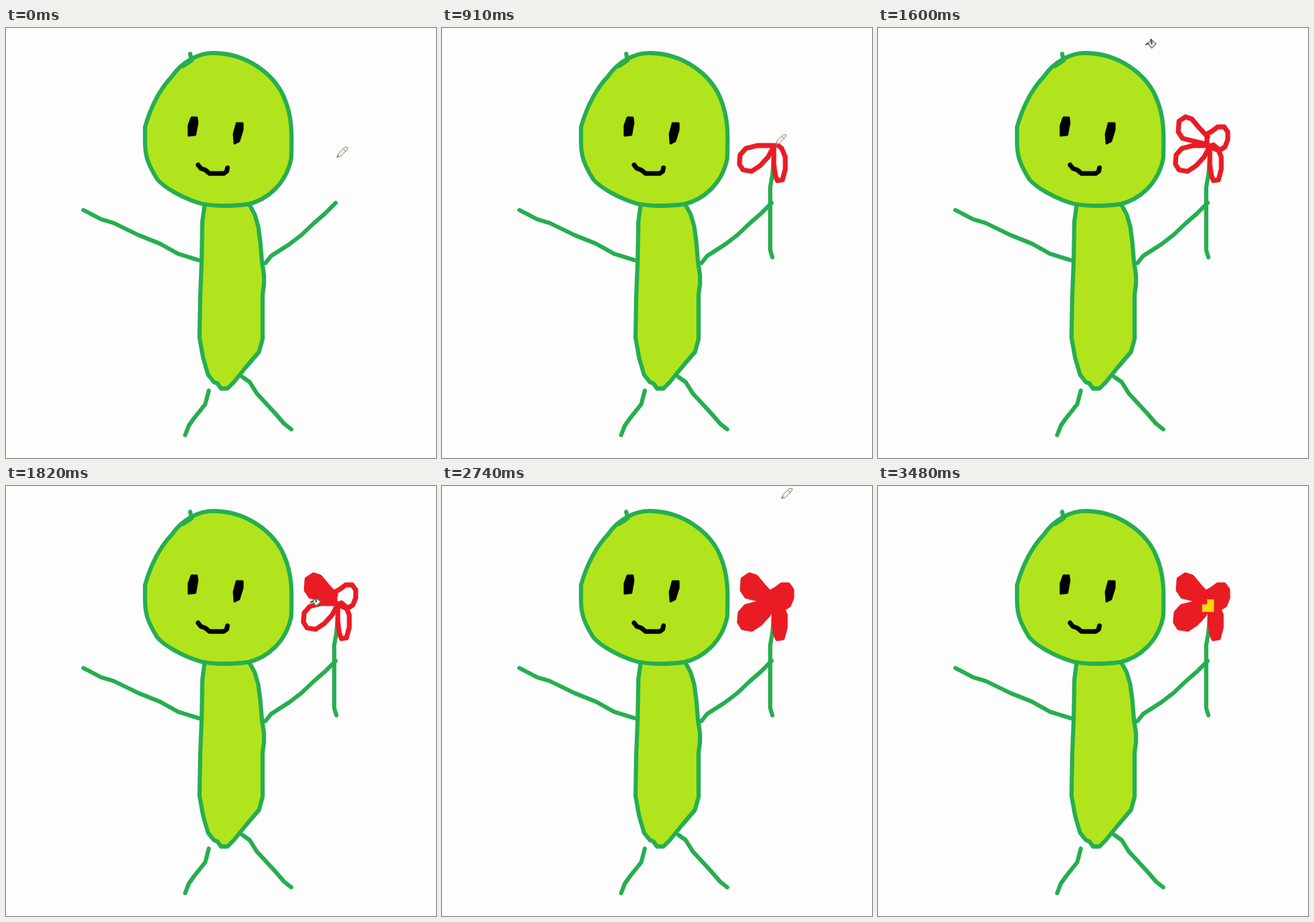
An HTML page for the animation above (3.5 s loop, 600x600 px).

```html
<!DOCTYPE html>
<html lang="en">
<head>
<meta charset="utf-8">
<title>Flower doodle</title>
<style>
html, body { margin: 0; width: 100%; height: 100%; overflow: hidden; background: #fdfdfd; }
svg { display: block; width: 100vw; height: 100vh; }
path { stroke-linejoin: round; stroke-linecap: round; }
.line { fill: none; stroke: #26ae50; stroke-width: 5.8; }
.skin { fill: #b1e41c; }
.eye { stroke: #000; stroke-width: 3; }
</style>
</head>
<body>
<svg viewBox="0 0 600 600">
  <g class="line">
    <path class="skin" d="M277 248L274 270 273 325 271 375 270 432 275 460 282 484 290 494 295 496 300 503 309 503 318 494 335 473 353 452 358 434 358 372 360 357 360 345 357 325 355 300 352 277 347 260 340 247"/>
    <path class="skin" d="M292 35C336 36 374 64 388 97C400 125 399 150 398 182C391 217 365 240 337 246C310 249 290 249 272 245C245 237 220 222 211 211C198 190 194 178 194 160L194 138C202 110 215 85 232 67C245 48 268 34 292 35Z"/>
    <path d="M257 36L259 45 247 53 255 48"/>
    <path d="M108 254L133 267 150 272 185 289 215 301 240 315 269 324"/>
    <path d="M362 328L370 318 395 302 412 289 430 272 445 259 460 244"/>
    <path d="M283 506L278 525 262 545 255 555 250 568"/>
    <path d="M330 487L340 494 350 510 375 537 388 552 398 560"/>
  </g>
  <path class="eye" d="M259 125L266 125 267 132 264 149 255 150 255 136Z"/>
  <path class="eye" d="M322 133L330 133 330 142 325 158 319 161 318 148Z"/>
  <path d="M268 191L272 196 278 198 284 203 304 203 308 200 309 195" fill="none" stroke="#000" stroke-width="6.5"/>
  <g id="ink" fill="none"></g>
  <g id="pencil" stroke-width="1">
    <path d="M0 0L2 -5 11 -14 15 -13 14 -10 5 -1Z" fill="#f5f1e6" stroke="#8b8b80"/>
    <path d="M9 -11L12 -8" stroke="#b5624f"/>
    <path d="M0 0L2 -2" stroke="#444"/>
  </g>
  <g id="bucket" stroke-width="1.3">
    <path d="M-4 0L0 -6 7 0 1 6Z" fill="#f6f8f1" stroke="#64725c"/>
    <path d="M-7 1L-4 -1M0 -6L1 0" fill="none" stroke="#3f5038" stroke-width="2"/>
  </g>
</svg>
<script>
const LOOP = 3500, STEP = 20;
const GREEN = '#26ae50', RED = '#e91c24', YELLOW = '#f8d90f';
const WIDTH = { [GREEN]: 5.8, [RED]: 6.8, [YELLOW]: 9.5 };
const $ = id => document.getElementById(id);

// start, end, tool, path, ink colour, time the shape is filled
const steps = [
  [0, 20, 'pencil', 'M462 180L463 183'],
  [20, 300, 'pencil', 'M463 183L461 205 458 222 458 245 458 310 461 320', GREEN],
  [300, 550, 'pencil', 'M461 320C510 300 525 225 471 173'],
  [550, 650, 'pencil', 'M471 173L463 163'],
  [650, 780, 'pencil', 'M463 164L440 164 424 168 416 177 415 190 420 198 432 200 444 192 455 180 463 165', RED, 1860],
  [780, 890, 'pencil', 'M463 165L463 190 465 205 468 213 475 212 479 197 479 180 474 168 468 163', RED, 1950],
  [890, 920, 'pencil', 'M468 163L458 160'],
  [920, 1090, 'pencil', 'M459 162L459 148 466 144 474 138 483 138 488 145 488 156 484 166 476 171 464 166', RED, 2140],
  [1090, 1280, 'pencil', 'M460 152L448 139 438 127 429 124 420 130 419 145 425 154 437 157 458 162', RED, 1770],
  [1280, 1460, 'pencil', 'M458 162L521 20'],
  [1600, 1760, 'bucket', 'M381 22L434 140'],
  [1790, 1850, 'bucket', 'M434 140L430 183'],
  [1880, 1940, 'bucket', 'M430 183L471 195'],
  [1970, 2050, 'bucket', 'M471 195L479 153'],
  [2140, 2290, 'bucket', 'M479 153L543 125'],
  [2740, 3000, 'pencil', 'M474 17L464 162'],
  [3000, 3300, 'pencil', 'M464 163L464 171 457 171 457 170', YELLOW],
  [3300, 3480, 'pencil', 'M457 170L493 48']
].map(([from, to, tool, d, color, fillAt = Infinity]) => {
  const path = document.createElementNS('http://www.w3.org/2000/svg', 'path');
  path.setAttribute('d', d);
  if (color) {
    path.setAttribute('stroke', color);
    path.setAttribute('stroke-width', WIDTH[color]);
    if (color === YELLOW) path.style.cssText = 'stroke-linecap:square;stroke-linejoin:miter';
    $('ink').append(path);
  }
  return { from, to, tool, path, color, fillAt, length: path.getTotalLength() };
});

// spans in which the pointer is visible
const visits = [[0, 1460], [1600, 2290], [2740, 3480]];
const ease = p => p * p * (3 - 2 * p);
const progress = (s, t) => Math.min(1, Math.max(0, (t - s.from) / (s.to - s.from)));

function draw(t) {
  let current = steps[0];
  for (const s of steps) {
    if (t >= s.from) current = s;
    if (!s.color) continue;
    const p = progress(s, t);
    s.path.style.visibility = p > 0 ? 'visible' : 'hidden';
    s.path.style.strokeDasharray = p < 1 ? `${p * s.length} 999` : 'none';
    s.path.setAttribute('fill', t >= s.fillAt ? s.color : 'none');
  }
  const { tool, path, color, length } = current;
  const p = progress(current, t);
  const { x, y } = path.getPointAtLength(length * (color ? p : ease(p)));
  const shown = visits.some(([a, b]) => t >= a && t < b);
  for (const id of ['pencil', 'bucket']) {
    $(id).style.visibility = shown && id === tool ? 'visible' : 'hidden';
  }
  $(tool).setAttribute('transform', `translate(${x} ${y})`);
}

const start = performance.now();
function tick() {
  const t = (performance.now() - start) % LOOP;
  draw(Math.floor(t / STEP) * STEP);
  requestAnimationFrame(tick);
}
tick();
</script>
</body>
</html>
```
